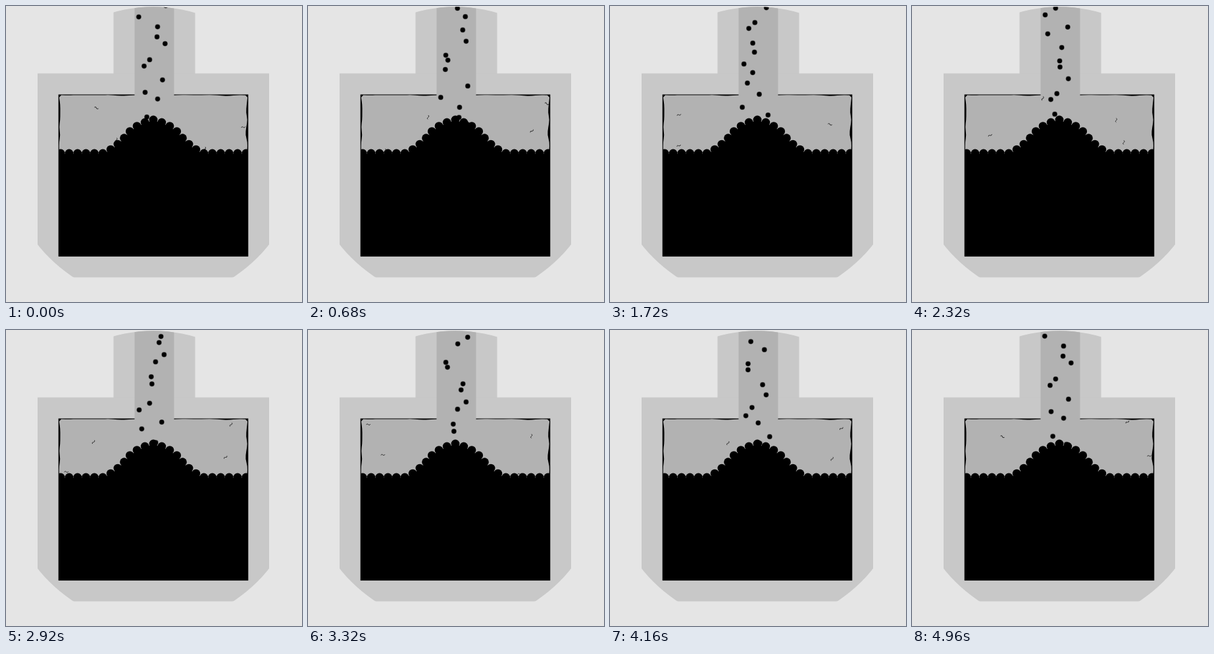
Recreate the animation shown at these times as an HTML page with a canvas. Size 450 by 450 pixels, loop 5000 ms.

```html
<!DOCTYPE html>
<html>
<head>
<meta charset="utf-8">
<style>
html, body { margin: 0; width: 100%; height: 100%; overflow: hidden; background: #e5e5e5; }
canvas { display: block; width: 450px; height: 450px; }
</style>
</head>
<body>
<canvas id="stage" width="450" height="450"></canvas>
<script>
const ctx = document.getElementById('stage').getContext('2d');
const LOOP = 5000, STEP = 40, SPEED = 0.18;
const MID = 224, LEFT = 80, RIGHT = 368, TOP = 134.5, FLOOR = 380.5;
const SURFACE = 219, CEILING = 136;
const BACK = '#e5e5e5', WALL = '#c8c8c8', AIR = '#b2b2b2', INK = '#000';

function seeded(seed) {
  return () => {
    seed = (seed * 1664525 + 1013904223) % 4294967296;
    return seed / 4294967296;
  };
}
const random = seeded(41);
const between = (a, b) => a + (b - a) * random();

// evenly spread births with jitter, spaced over one loop
function stream(count, make) {
  const gap = LOOP / count;
  return Array.from({ length: count }, (_, i) => ({ born: (i + between(-0.4, 0.4)) * gap, ...make(i) }));
}

const grains = stream(54, () => ({ x: between(201, 243) }));
const wisps = stream(40, i => ({
  x: i % 2 ? between(83, 200) : between(293, 366),
  turn: between(-1.4, 0.6)
}));

// the heap is a chain of beads that walks down a slope and then runs level
const slopes = [17, 25, 37, 49, 44, 37, 26];
function makeHeap() {
  const side = [];
  let d = 0, y = 173;
  for (let i = 0; i < 12; i++) {
    const angle = (slopes[i] || 0) * Math.PI / 180;
    const step = angle ? 13.4 : 12.8;
    d += step * Math.cos(angle);
    y += step * Math.sin(angle);
    side.push([d, y]);
  }
  const mirror = sign => side.map(([dx, y]) => [MID + sign * dx, y]);
  return [...mirror(-1).reverse(), [MID, 173], ...mirror(1)];
}
const heap = makeHeap();

// uneven lining: offsets from a straight edge at regular distances
const lining = (count, depth) => Array.from({ length: count }, () => 0.7 + depth * random() ** 2);
const roof = lining(24, 2), leftSide = lining(9, 2), rightSide = lining(9, 3.5);

function box(color, x, y, w, h) {
  ctx.fillStyle = color;
  ctx.fillRect(x, y, w, h);
}

function dot(x, y, r) {
  ctx.beginPath();
  ctx.arc(x, y, r, 0, 7);
  ctx.fill();
}

function smooth(points) {
  ctx.lineTo(...points[0]);
  for (let i = 1; i < points.length; i++) {
    const [px, py] = points[i - 1], [x, y] = points[i];
    ctx.quadraticCurveTo(px, py, (px + x) / 2, (py + y) / 2);
  }
  ctx.lineTo(...points[points.length - 1]);
}

function drawAir() {
  const span = (list, i, from, to) => from + (to - from) * i / (list.length - 1);
  ctx.fillStyle = AIR;
  ctx.beginPath();
  smooth(leftSide.map((d, i) => [LEFT + d, span(leftSide, i, 230, 139)]));
  smooth(roof.map((d, i) => [span(roof, i, LEFT + 4, RIGHT - 4), TOP + d]));
  smooth(rightSide.map((d, i) => [RIGHT - d, span(rightSide, i, 139, 230)]));
  ctx.fill();
  box(AIR, 195.5, 0, 60, 140);
}

function drawVessel() {
  box(WALL, 163.5, 0, 124, 110);
  box(WALL, 48, 102.5, 352, 310);
  box(INK, LEFT - 0.3, TOP, RIGHT - LEFT + 0.6, FLOOR - TOP + 0.3);
  drawAir();
}

function drawWisp({ x, turn }, y) {
  ctx.save();
  ctx.translate(x, y);
  ctx.rotate(turn);
  ctx.beginPath();
  ctx.moveTo(-3, 0.8);
  ctx.bezierCurveTo(-1.5, -3.4, 0.8, 3.4, 3, -0.8);
  ctx.stroke();
  ctx.restore();
}

function drawGrain(x, y) {
  ctx.fillStyle = 'rgba(0,0,0,.45)';
  dot(x, y, 4.1);
  ctx.fillStyle = INK;
  dot(x, y, 3.4);
}

function drawHeap() {
  ctx.save();
  ctx.beginPath();
  ctx.rect(LEFT, TOP, RIGHT - LEFT, FLOOR - TOP);
  ctx.clip();
  ctx.fillStyle = INK;
  ctx.beginPath();
  ctx.moveTo(LEFT, FLOOR);
  heap.forEach(([x, y]) => ctx.lineTo(x, y + 1));
  ctx.lineTo(RIGHT, FLOOR);
  ctx.fill();
  heap.forEach(([x, y]) => dot(x, y, 6.4));
  ctx.restore();
}

const travel = (t, born) => ((t - born + LOOP) % LOOP) * SPEED;

function draw(t) {
  box(BACK, 0, 0, 450, 450);
  ctx.save();
  ctx.beginPath();
  ctx.arc(MID, 224.8, 223.5, 0, 7);
  ctx.clip();
  drawVessel();
  ctx.strokeStyle = '#222';
  ctx.lineWidth = 0.9;
  for (const wisp of wisps) {
    const y = SURFACE + 4 - travel(t, wisp.born);
    if (y > CEILING) drawWisp(wisp, y);
  }
  for (const { born, x } of grains) {
    const y = travel(t, born) - 4;
    if (y < 190) drawGrain(x, y);
  }
  drawHeap();
  ctx.restore();
}

const start = performance.now();
function tick() {
  const t = (performance.now() - start + 4) % LOOP;
  draw(Math.floor(t / STEP) * STEP);
  requestAnimationFrame(tick);
}
tick();
</script>
</body>
</html>
```
